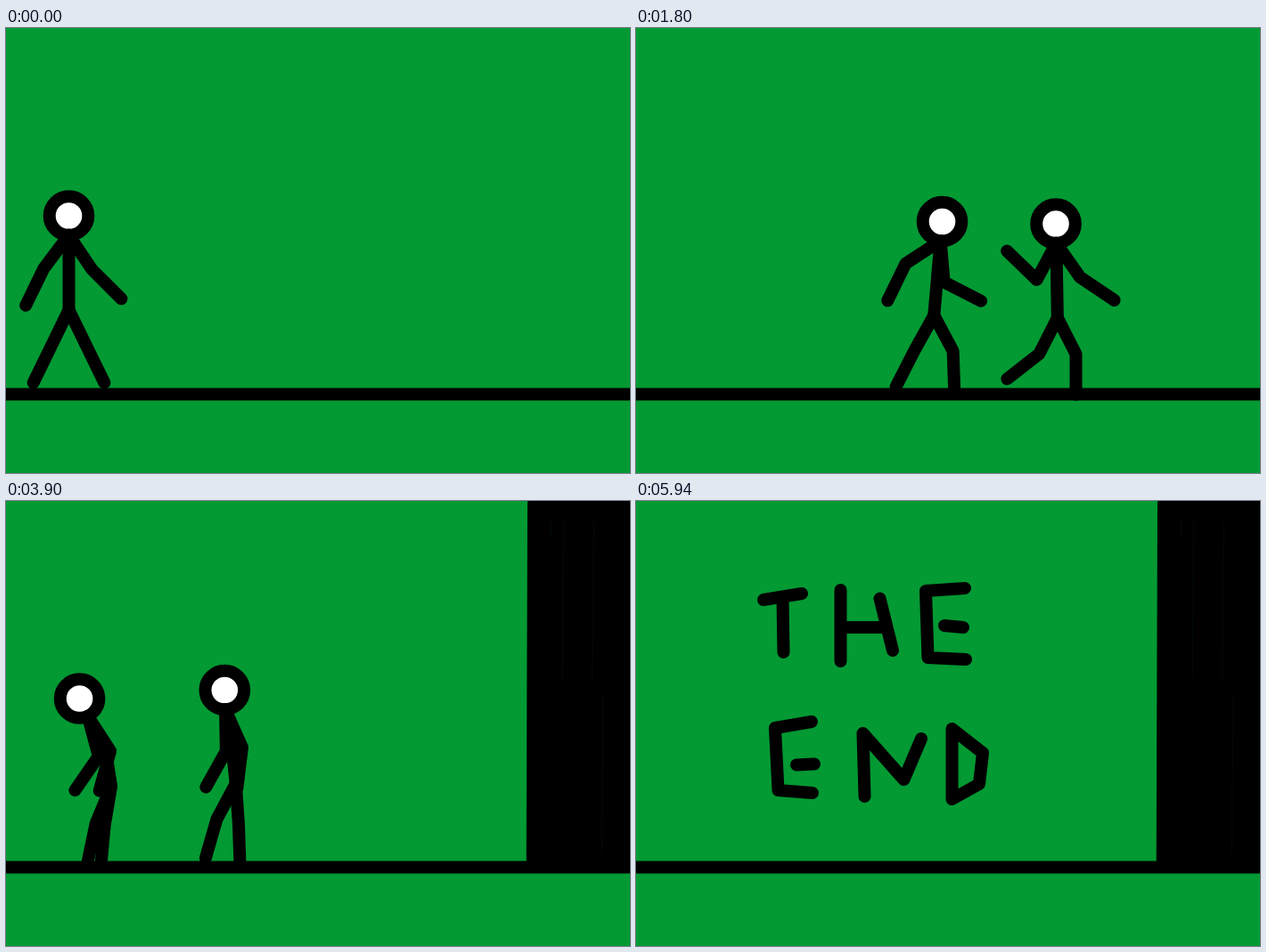
Recreate the animation shown at these times as an HTML page with a canvas. Size 700 by 500 pixels, loop 6180 ms.

```html
<!DOCTYPE html>
<html lang="en">
<head>
<meta charset="utf-8">
<title>Stick figure short</title>
<style>
  html, body { margin: 0; width: 100%; height: 100%; overflow: hidden; background: #039933; }
  canvas { display: block; }
</style>
</head>
<body>
<canvas id="stage" width="700" height="500"></canvas>
<script>
const ctx = document.getElementById('stage').getContext('2d');
const LOOP = 6180, STEP = 60, GREEN = '#039933';
const WALL_AT = 2220, TITLE_AT = 4380;
const HEAD = 21.8, BACK = 42, ARM = 46.5, LEG = 45.5;

// A pose is the head centre plus bone angles in degrees: 0 points down, 90 right.
const figure = (x, y, [neck, upper = neck, lower = upper], arms, legs) =>
  ({ x, y, spine: [neck, upper, lower], arms, legs });
const move = (p, dx, dy = 0) => ({ ...p, x: p.x + dx, y: p.y + dy });

const aStart = figure(70.5, 211, [0], [[-37, -26], [34, 45]], [[-26, -26], [26, 26]]);
const aTalk = figure(239.5, 211, [-5], [[54, 123], [-3, 15]], [[-18, -22], [22, 5]]);
const aFight = figure(343.5, 217.5, [-5], [[-57, -26], [5, 63]], [[-29, -27], [28, 2]]);
const aKneel = figure(329, 253, [39, -5], [[138, 206], [97, 156]], [[-8, -81], [18, -89]]);
const aLeave = figure(283, 222, [25, 28, 9], [[-5, -56], [53, 6]], [[-37, -19], [5, 2]]);
const bTalk = figure(539, 212.5, [4], [[-48, -100], [13, -66]], [[-28, -8], [19, 20]]);
const bFight = figure(471, 220, [1], [[-28, -134], [35, 56]], [[-27, -52], [27, 0]]);
const bPalm = figure(467, 220, [9, 2], [[62, 125], [135, 273]], [[-17, -15], [29, 9]]);
const bLeave = figure(476, 212.5, [2, 10, 6], [[1, -29], [24, -7]], [[-28, -16], [4, 2]]);

const aClose = move(aTalk, 95, 5), bClose = move(bTalk, -45, 4);
const peek = { ...move(aFight, -320), arms: [aFight.arms[0], [42, 109]] };
const away = move(peek, -125);

// Keys: time, pose, and how the figure gets there (walk = limb swings, wave = forearm degrees).
const actorA = [
  [0, aStart],
  [660, aTalk, { walk: 2 }],
  [840, aTalk, { wave: 20 }],
  [1080, aClose, { walk: 1 }],
  [1200, aClose],
  [1800, aFight, { walk: 2 }],
  [1860, aFight],
  [2340, aKneel],
  [2640, aKneel, { wave: 20 }],
  [2760, aKneel],
  [3420, move(aLeave, 12)],
  [3540, aLeave],
  [4140, move(aLeave, -370), { walk: 2, power: 1.2 }],
  [4560, away],
  [4980, peek, { walk: 1 }],
  [5280, peek, { wave: 25 }],
  [5460, peek],
  [5940, away, { walk: 1 }]
];
const actorB = [
  [60, move(bTalk, 94)],
  [660, bTalk, { walk: 2 }],
  [840, bTalk, { wave: 20 }],
  [1080, bClose, { walk: 1 }],
  [1200, bClose],
  [1800, bFight, { walk: 2 }],
  [1860, bFight],
  [2520, bPalm],
  [2760, bPalm],
  [3420, move(bLeave, 8)],
  [3540, bLeave],
  [4260, move(bLeave, -530), { walk: 3, power: 1.2 }]
];

// Blends numbers, lists and poses alike.
function mix(a, b, k) {
  if (typeof a === 'number') return a + (b - a) * k;
  if (Array.isArray(a)) return a.map((v, i) => mix(v, b[i], k));
  return Object.fromEntries(Object.keys(a).map(key => [key, mix(a[key], b[key], k)]));
}

const swap = ([a, b], k) => [mix(a, b, k), mix(b, a, k)];

function poseAt(keys, t) {
  if (t < keys[0][0]) return null;
  const next = keys.findIndex(key => key[0] > t);
  if (next < 0) return keys[keys.length - 1][1];
  const [t0, from] = keys[next - 1];
  const [t1, to, { walk = 0, wave = 0, power = 1 } = {}] = keys[next];
  const u = (t - t0) / (t1 - t0);
  const p = mix(from, to, u ** power);
  const k = (1 - Math.cos(2 * Math.PI * walk * u)) / 2;
  const tilt = wave * Math.sin(2 * Math.PI * u);
  return {
    ...p,
    arms: swap(p.arms, k).map(([upper, fore]) => [upper, fore + tilt]),
    legs: swap(p.legs, k)
  };
}

function bone([x, y], length, degrees) {
  const a = degrees * Math.PI / 180;
  return [x + length * Math.sin(a), y + length * Math.cos(a)];
}

function line(points) {
  ctx.beginPath();
  points.forEach(([x, y]) => ctx.lineTo(x, y));
  ctx.stroke();
}

function limb(joint, length, [upper, lower]) {
  const middle = bone(joint, length, upper);
  const end = bone(middle, length, lower);
  line([joint, middle, end]);
  return end;
}

function drawFigure(p) {
  if (!p) return;
  ctx.beginPath();
  ctx.arc(p.x, p.y, HEAD, 0, 2 * Math.PI);
  ctx.fillStyle = '#fff';
  ctx.fill();
  ctx.stroke();
  const [tilt, ...back] = p.spine;
  const neck = bone([p.x, p.y], HEAD, tilt);
  const hip = limb(neck, BACK, back);
  p.arms.forEach(arm => limb(neck, ARM, arm));
  p.legs.forEach(leg => limb(hip, LEG, leg));
}

const wall = new Path2D('M585 0H700V412H583.7Z');
const streaks = new Path2D('M611.5 24V40M625.5 24L624 200M659.5 24L657.5 200M669.5 220L668.5 395');
const title = new Path2D(
  'M143 111L186 104M164.5 108L165.5 170' +
  'M229.5 100V180M236 142H278M273.5 109.5L288 168' +
  'M369 98L325 101L327.5 176L370 178M346 140L367 142' +
  'M197 248L156 255L159.5 325L198 328M180 296.5L200 295.5' +
  'M256.5 332L254.5 261L300.5 313L320 267' +
  'M354.5 256L389 283L385 318L354.5 335Z');

function drawWall() {
  ctx.fillStyle = '#000';
  ctx.fill(wall);
  ctx.save();
  ctx.lineWidth = 1;
  ctx.strokeStyle = '#020c06';
  ctx.stroke(streaks);
  ctx.restore();
}

function draw(t) {
  ctx.fillStyle = GREEN;
  ctx.fillRect(0, 0, 700, 500);
  ctx.strokeStyle = '#000';
  ctx.lineWidth = 14;
  ctx.lineCap = ctx.lineJoin = 'round';
  line([[-10, 411.5], [710, 411.5]]);
  if (t >= WALL_AT) drawWall();
  drawFigure(poseAt(actorA, t));
  drawFigure(poseAt(actorB, t));
  if (t >= TITLE_AT) ctx.stroke(title);
}

let start;
function tick(now) {
  start ??= now;
  const t = Math.max(0, now - start) % LOOP;
  draw(Math.floor(t / STEP) * STEP);
  requestAnimationFrame(tick);
}
draw(0);
requestAnimationFrame(tick);
</script>
</body>
</html>
```
